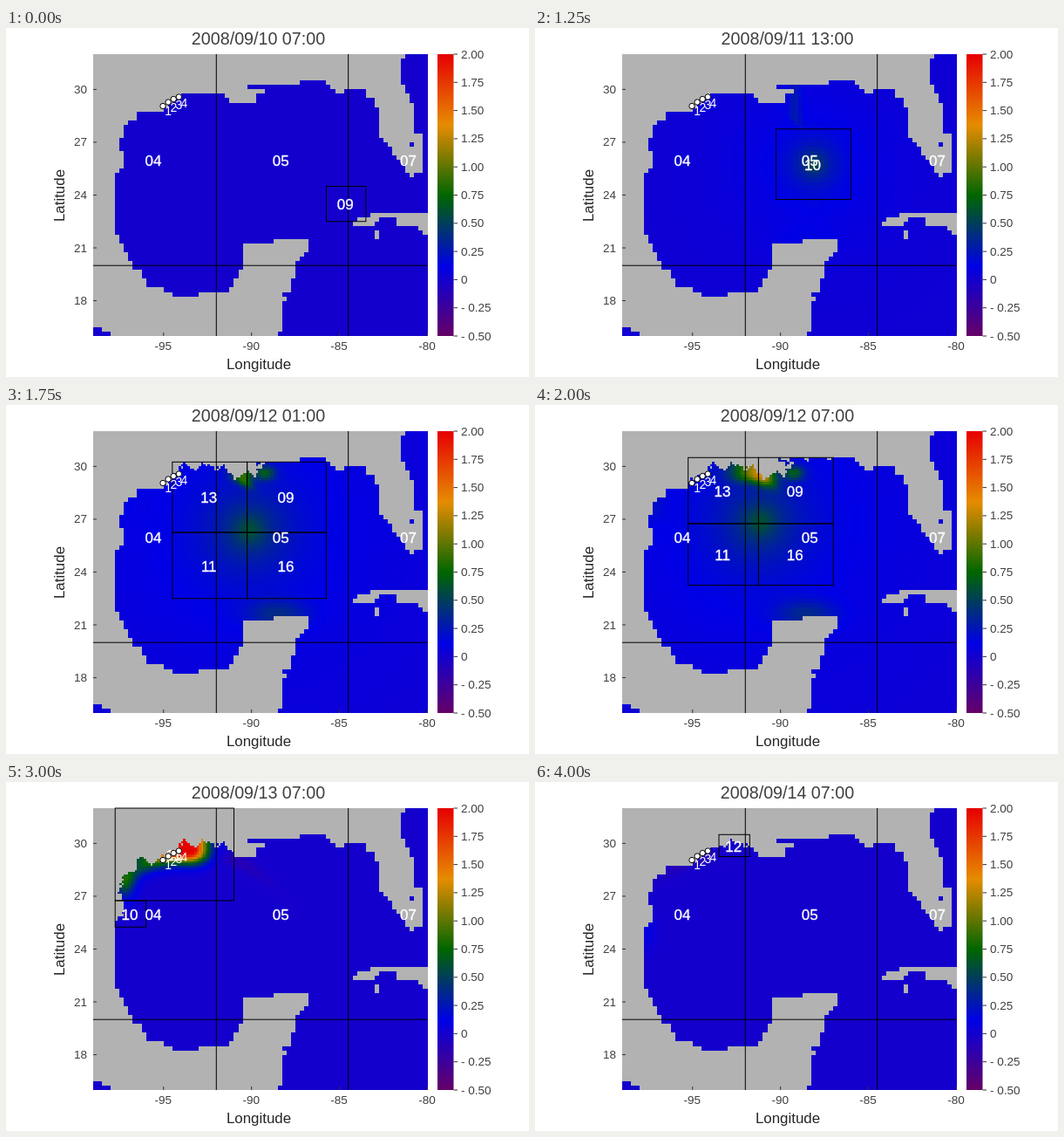
Write an HTML page with a canvas that moves like this. It is 600 by 400 pixels and loops after 4250 ms.

```html
<!DOCTYPE html>
<html lang="en">
<head>
<meta charset="utf-8">
<title>Storm surge</title>
<style>
html, body { margin: 0; width: 100%; height: 100%; overflow: hidden; background: #fff; }
canvas { display: block; }
</style>
</head>
<body>
<canvas id="stage" width="600" height="400"></canvas>
<script>
const ctx = document.getElementById('stage').getContext('2d');
const X0 = 100, Y0 = 30, W = 383.5, H = 323, CELL = 5.046;
const STEP = 250, COUNT = 17, COLS = 152, ROWS = 128;
const FONT = '"Liberation Sans", Arial, sans-serif';
const px = col => X0 + col * CELL, py = row => Y0 + row * CELL;

// Land outline in quarter-degree cells, sampled onto the grid below
const land = new Path2D(
  'M0 0H71L70.2 2 70 5.5 71.6 9.5 73 12V18H75V27H73V28H72.3L66 19 65 18V12H64V10.5L62 10 61.5 8' +
  'H57V9H55L53 6H47V7H35V8H39V9H37V11H31L29.5 9H20V10H18L15.7 13H10V15H8L7 16V19H6V22H7V26H6L5 27V41' +
  'L5.6 41 9.4 49H11V51H12V53H16V54H18V55H24V54H31L32 52 33 51V49H34V44L35 43H41V42H49V44' +
  'L46 47V51H45V54H43V55H44V56H43V62L41 64H4V63H2V62H0Z');
land.addPath(new Path2D(
  'M72 20V21H73V20ZM64 40V42H65V40Z' +
  'M76 36H63V37H60V38H59V39H64V38H65V37H69V39H74V40H75V41H76Z'));

const noise = (x, y) => {
  const v = Math.sin(x * 12.99 + y * 78.23) * 43758.5;
  return v - Math.floor(v) - 0.5;
};
const isLand = (x, y) => ctx.isPointInPath(land, x, y, 'evenodd');

// Refined patches resolve a more ragged shore lying slightly inland
const coarseLand = [], fineLand = [];
for (let r = 0; r < ROWS; r++) for (let c = 0; c < COLS; c++) {
  const x = c / 2 + 0.25, y = r / 2 + 0.25;
  coarseLand.push(isLand(Math.floor(x) + 0.5, Math.floor(y) + 0.5));
  fineLand.push(isLand(x + noise(c, r) * 0.8, y + 1 + 0.7 * Math.sin(x * 1.3) + noise(r, c) * 0.8));
}

// Refined area along the storm's way: step, left, top, width, height in cells
const track = [
  [0, 53, 30, 9, 8], [3, 44, 23, 12, 11], [5, 35, 17, 17, 16], [7, 18, 7, 35, 31],
  [10, 8, 4, 30, 26], [12, 5, 0, 27, 21], [16, 22, 6, 7, 5]
];
// How the area is divided: first step, columns, labels
const stages = [
  [0, 1, ['09']], [5, 1, ['10']], [6, 2, ['13', '09', '11', '16']],
  [9, 2, ['15', '10']], [12, 1, ['11']], [14, 1, ['12']]
];
// Short-lived side patches: first step, last step, box, label
const sidePatches = [[2, 3, [56, 36, 5, 5], '11'], [12, 12, [5, 21, 7, 6], '10']];

function areaAt(k) {
  const i = Math.max(1, track.findIndex(key => key[0] >= k));
  const a = track[i - 1], b = track[i], t = (k - a[0]) / (b[0] - a[0]);
  return a.slice(1).map((v, j) => v + (b[j + 1] - v) * t);
}

function patchesAt(k) {
  const [left, top, w, h] = areaAt(k).map(Math.round);
  const [, cols, labels] = stages.filter(s => s[0] <= k).pop();
  const rows = labels.length / cols;
  const xs = [left, left + Math.floor(w / cols), left + w];
  const ys = [top, top + Math.ceil(h / rows), top + h];
  const main = labels.map((label, i) => {
    const c = i % cols, r = Math.floor(i / cols);
    return { x: xs[c], y: ys[r], w: xs[c + 1] - xs[c], h: ys[r + 1] - ys[r], label };
  });
  const side = sidePatches.filter(([from, to]) => k >= from && k <= to)
    .map(([, , [x, y, w, h], label]) => ({ x, y, w, h, label }));
  return main.concat(side);
}

const bell = (v, mid, width) => Math.exp(-(((v - mid) / width) ** 2));
const mound = (x, y, cx, cy, sx, sy) => bell(x, cx, sx) * bell(y, cy, sy);
const shoreY = x => 78 + 0.0075 * (Math.max(0, 200 - x) ** 2 + Math.max(0, x - 240) ** 2);

// Water height in metres as a function of place for one step
function surfaceAt(k) {
  const [left, top, w, h] = areaAt(k);
  const cx = px(left + w / 2), cy = py(top + h / 2);
  const lift = Math.max(0, Math.min(0.12 * k, 0.6, 0.2 * (12 - k)));
  const radius = Math.min(25, k * k / 2);
  const spread = bell(k, 10.3, 2);
  const surgeX = 235 - 12.5 * (k - 10);
  const surge = 2.4 * bell(k, 11.5, k < 11.5 ? 4 : 1.9);
  const delta = 0.6 * bell(k, 7.5, 1.3), bank = 0.28 * bell(k, 7.5, 2);
  const swell = 0.6 * bell(k, 12, 3), late = Math.max(0, k - 12);
  const drawdown = 0.12 * Math.max(0, Math.min(1, (k - 10) / 2));
  return (x, y) => {
    const shore = shoreY(x);
    return lift * (1 - Math.exp(-radius / (1 + Math.hypot(x - cx, y - cy))))
      + surge * mound(x, Math.max(shore, y), surgeX, shore, 8 + spread * (x < surgeX ? 85 : 26), 6 + 17 * spread)
      + delta * mound(x, y, 297, 78, 12, 8)
      + bank * mound(x, y, 312, 240, 35, 16)
      + swell * mound(x, y, 137 - 2 * late, 113 + 15 * late, 12, 20)
      - drawdown * mound(x, y, 270 - 24 * (k - 12), shore + 8, 30, 8);
  };
}

const palette = [[102, 0, 102], [0, 0, 230], [0, 102, 0], [230, 140, 0], [230, 0, 0]];
function colour(value) {
  const t = Math.max(0, Math.min(3.9999, (value + 0.5) / 2.5 * 4)), i = Math.floor(t);
  return palette[i].map((v, j) => v + (palette[i + 1][j] - v) * (t - i));
}

const map = document.createElement('canvas');
map.width = COLS;
map.height = ROWS;
const mapCtx = map.getContext('2d'), image = mapCtx.createImageData(COLS, ROWS);

function paintField(k, patches) {
  const surface = surfaceAt(k);
  for (let r = 0; r < ROWS; r++) for (let c = 0; c < COLS; c++) {
    let x = c / 2 + 0.25, y = r / 2 + 0.25;
    const fine = k > 5 && patches.some(p => x > p.x && x < p.x + p.w && y > p.y && y < p.y + p.h);
    const i = r * COLS + c;
    let rgb = [178, 178, 178];
    if (!(fine ? fineLand : coarseLand)[i]) {
      if (!fine) { x = Math.floor(x) + 0.5; y = Math.floor(y) + 0.5; }
      rgb = colour(surface(px(x), py(y)));
    }
    image.data.set([...rgb, 255], i * 4);
  }
  mapCtx.putImageData(image, 0, 0);
  ctx.imageSmoothingEnabled = false;
  ctx.drawImage(map, X0, Y0, W, H);
}

function text(str, x, y, size, fill = '#404040', align = 'center') {
  ctx.font = size + 'px ' + FONT;
  ctx.fillStyle = fill;
  ctx.textAlign = align;
  ctx.fillText(str, x, y);
}

function tileLabel(str, x, y) {
  text(str, x, y, 17, '#fff');
  ctx.strokeStyle = '#fff';
  ctx.lineWidth = 0.35;
  ctx.strokeText(str, x, y);
}

function line(x1, y1, x2, y2, stroke = '#000') {
  ctx.strokeStyle = stroke;
  ctx.lineWidth = 1;
  ctx.beginPath();
  ctx.moveTo(x1, y1);
  ctx.lineTo(x2, y2);
  ctx.stroke();
}

function drawAxes() {
  for (let lon = -95; lon <= -80; lon += 5) {
    const x = px((lon + 99) * 4);
    line(x, 353, x, 349, '#333');
    text(lon, x - 0.5, 369, 13.5);
  }
  for (let lat = 18; lat <= 30; lat += 3) {
    const y = py((32 - lat) * 4);
    line(100, y, 104, y, '#333');
    text(lat, 93, y + 4.5, 13.5, '#404040', 'right');
  }
  text('Longitude', 290, 391, 16.9, '#262626');
  ctx.save();
  ctx.translate(67, 192);
  ctx.rotate(-Math.PI / 2);
  text('Latitude', 0, 0, 16.9, '#262626');
  ctx.restore();
}

function drawScale() {
  for (let y = 0; y < H; y++) {
    ctx.fillStyle = `rgb(${colour(2 - 2.5 * y / H).map(Math.round)})`;
    ctx.fillRect(495, Y0 + y, 18.5, 1);
  }
  for (let i = 0; i <= 10; i++) {
    const v = 2 - i / 4, y = Y0 + i * H / 10;
    line(513.5, y, 518, y, '#333');
    text(v ? (v < 0 ? '- ' : '') + Math.abs(v).toFixed(2) : '0', 522, y + 4.5, 13.5, '#404040', 'left');
  }
}

function drawGauges() {
  for (let i = 0; i < 4; i++) {
    const x = 180 + 6.1 * i, y = 89.5 - 5 * i + 0.5 * i * i;
    ctx.beginPath();
    ctx.arc(x, y, 3.2, 0, 7);
    ctx.fillStyle = '#fff';
    ctx.fill();
    ctx.strokeStyle = '#000';
    ctx.lineWidth = 1;
    ctx.stroke();
    text(i + 1, x + 6.2, y + 10.5 + 0.5 * i, 14, '#fff');
  }
}

function draw(k) {
  const patches = patchesAt(k);
  ctx.fillStyle = '#fff';
  ctx.fillRect(0, 0, 600, 400);
  paintField(k, patches);
  drawAxes();
  drawScale();

  for (const col of [28, 58]) line(px(col), Y0, px(col), Y0 + H);
  line(X0, py(48), X0 + W, py(48));
  for (const { x, y, w, h, label } of patches) {
    ctx.strokeStyle = '#000';
    ctx.lineWidth = 1;
    ctx.strokeRect(px(x), py(y), w * CELL, h * CELL);
    tileLabel(label, px(x + w / 2) - 1, py(y + h / 2) + 6.7);
  }
  ['04', '05', '07'].forEach((label, i) => tileLabel(label, 169 + 146.2 * i, 158));
  drawGauges();

  const stamp = new Date(Date.UTC(2008, 8, 10, 7 + 6 * k)).toISOString();
  text(stamp.slice(0, 16).replace(/-/g, '/').replace('T', ' '), 289.5, 19, 19.7);
}

const start = performance.now();
let shown = -1;
function tick() {
  const k = Math.floor((performance.now() - start) / STEP) % COUNT;
  if (k !== shown) draw(shown = k);
  requestAnimationFrame(tick);
}
tick();
</script>
</body>
</html>
```
